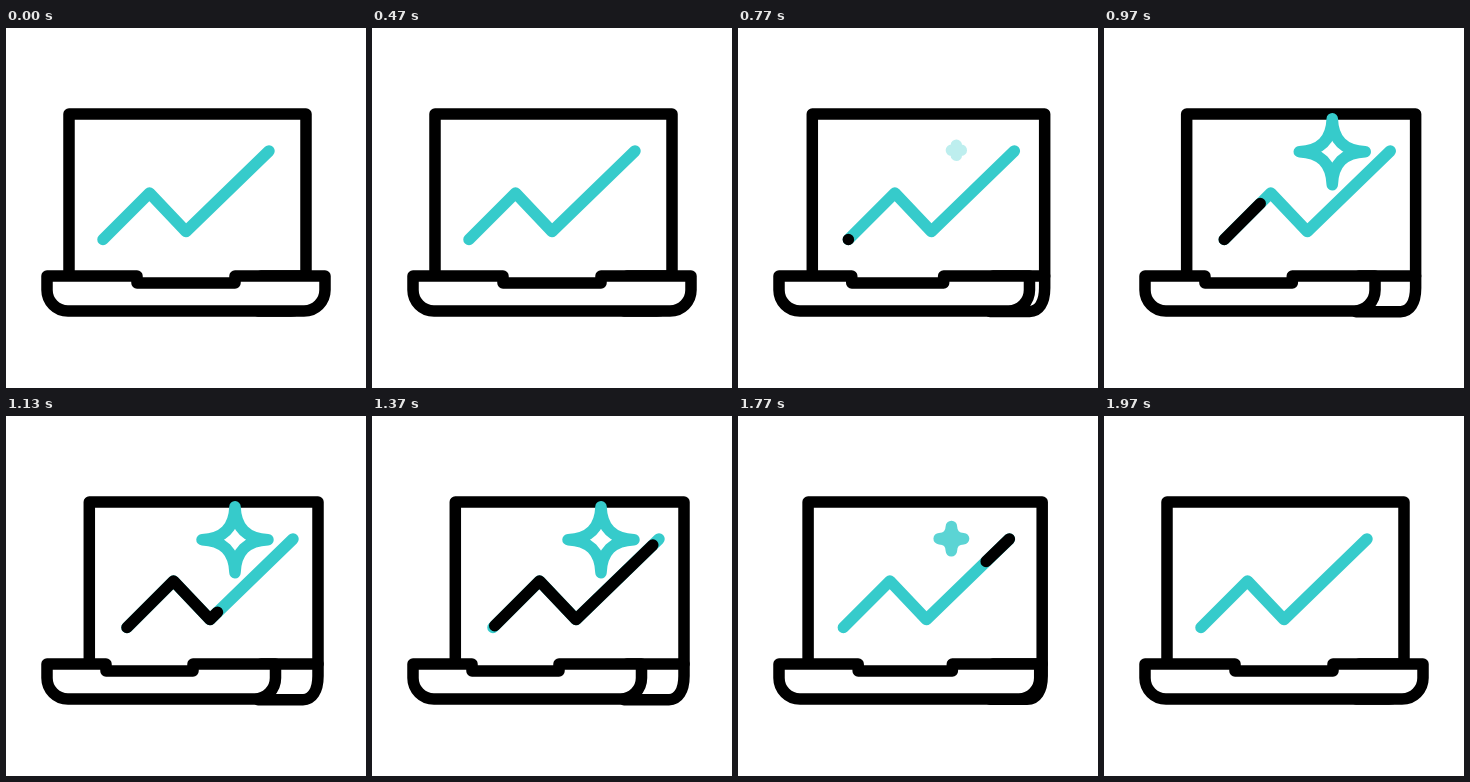
An HTML page that plays this animation: 360x360 px, repeating every 2500 ms.

```html
<!DOCTYPE html>
<html lang="en">
<head>
<meta charset="utf-8">
<title>Laptop chart</title>
<style>
  html, body { margin: 0; width: 100%; height: 100%; overflow: hidden; background: #fff; }
  svg { display: block; width: 100%; height: 100%; }
  path { fill: none; stroke: #000; stroke-width: 11.5; stroke-linecap: round; stroke-linejoin: round; }
  .accent { stroke: #36cbcb; }
  #front { fill: #fff; }
</style>
</head>
<body>
<svg viewBox="0 0 360 360">
  <path id="screen"/>
  <path id="side"/>
  <path id="front"/>
  <g id="chart">
    <path class="accent" d="M97 211.5L143.5 165L180 203.5L263 123"/>
    <path id="trace" pathLength="1" d="M97 211.5L143.5 165L180 203.5L263 123"/>
    <path id="star" class="accent"/>
  </g>
</svg>
<script>
  const LOOP = 2500;
  const $ = id => document.getElementById(id);
  const [screenEl, side, front, chart, trace, star] =
    ['screen', 'side', 'front', 'chart', 'trace', 'star'].map($);

  const mix = (a, b, k) => a + (b - a) * k;

  // eased progress from 0 to 1 between two times
  function ease(t, from, to) {
    const u = Math.min(1, Math.max(0, (t - from) / (to - from)));
    return u * u * (3 - 2 * u);
  }

  function starPath(scale) {
    const r = 33 * scale, c = 1.2 * scale;
    return `M0 ${-r}Q${c} ${-c} ${r} 0Q${c} ${c} 0 ${r}` +
      `Q${-c} ${c} ${-r} 0Q${-c} ${-c} 0 ${-r}Z`;
  }

  function drawLaptop(turn) {
    const left = mix(63, 83.3, turn);
    const right = mix(300, 312, turn);
    const edge = mix(319, 269.5, turn);
    const notchL = mix(131, 100, turn);
    const notchR = mix(229, 187, turn);
    const bottom = 283 + turn * 0.7;

    screenEl.setAttribute('d', `M${left} 248V86H${right}V248`);
    side.setAttribute('d', `M255 248H${right}V260` +
      `C${right} 275 ${right - 6} ${bottom} ${right - 15} ${bottom}H252`);
    front.setAttribute('d', `M41 248V262A21 21 0 0 0 62 283H${edge - 21}` +
      `A21 21 0 0 0 ${edge} 262V248H${notchR}V255H${notchL}V248Z`);
  }

  function draw(t) {
    const turn = ease(t, 470, 1030) - ease(t, 1470, 1970);
    drawLaptop(turn);
    chart.setAttribute('transform', `translate(${24 * turn} 0)`);

    const head = ease(t, 765, 1450);
    const tail = ease(t, 1337, 1903);
    const length = head - tail;
    trace.style.display = length > 0 ? '' : 'none';
    trace.setAttribute('stroke-dasharray', `${length} 2`);
    trace.setAttribute('stroke-dashoffset', -tail);

    const size = ease(t, 710, 960) - ease(t, 1630, 1870);
    star.style.display = size > 0 ? '' : 'none';
    star.setAttribute('d', starPath(size));
    star.setAttribute('transform', `translate(205 ${mix(122, 123.7, size)})`);
    star.setAttribute('opacity', Math.min(1, 2.2 * size));
  }

  const start = performance.now();
  function tick() {
    draw((performance.now() - start) % LOOP);
    requestAnimationFrame(tick);
  }
  tick();
</script>
</body>
</html>
```
